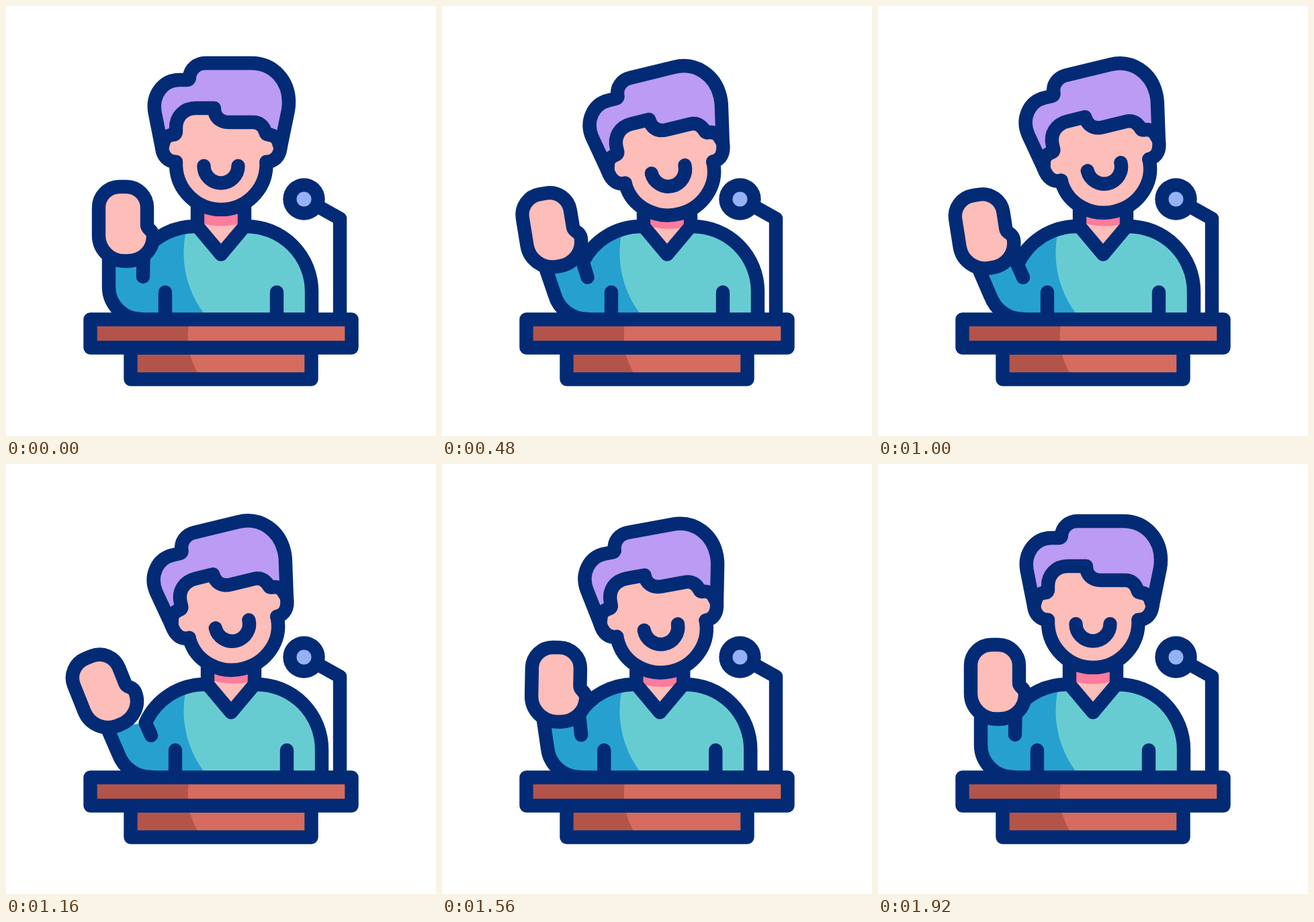
An HTML page with a canvas for the animation above (2000 ms loop, 640x640 px).

```html
<!DOCTYPE html>
<html lang="en">
<head>
<meta charset="utf-8">
<title>Speaker</title>
<style>
html, body { margin: 0; width: 100%; height: 100%; overflow: hidden; background: #fff; }
canvas { display: block; width: 640px; height: 640px; }
</style>
</head>
<body>
<canvas id="stage" width="640" height="640"></canvas>
<script>
const ctx = document.getElementById('stage').getContext('2d');
const LOOP = 2000, STEP = 40, LINE = 20.4, TAU = Math.PI * 2, DEG = Math.PI / 180;
const C = {
  navy: '#032b75', hair: '#bb9bf3', skin: '#fdbdb9', pink: '#fd7b9c',
  blue: '#26a1cf', teal: '#67ccd2', dark: '#b3544a', light: '#d56c5f',
  mic: '#94b2f5', ray: '#ffcc52'
};

const clamp = u => Math.max(0, Math.min(1, u));
const smooth = (t, a, b) => { const u = clamp((t - a) / (b - a)); return u * u * (3 - 2 * u); };
const hold = (t, a, b, c, d) => smooth(t, a, b) - smooth(t, c, d);
const mix = (a, b, u) => a + (b - a) * u;

function fill(path, color) {
  ctx.fillStyle = color;
  ctx.fill(path);
}
function stroke(path, color = C.navy) {
  ctx.strokeStyle = color;
  ctx.stroke(path);
}
function disc(x, y, r, color) {
  ctx.fillStyle = color;
  ctx.beginPath();
  ctx.arc(x, y, r, 0, TAU);
  ctx.fill();
}
function group(draw) {
  ctx.save();
  draw();
  ctx.restore();
}

const hair = new Path2D(
  'M232 211 L221.5 158 C217 132 234 110 258 110 H269 Q273 110 273 106 ' +
  'C274 94 284 85 297 85 H365 C399 85 421 112 421 143 Q421 149 420 155 L408.5 211 ' +
  'L404 198 Q398 191.5 390 191.5 Q387 191 386 187 C383 178 377 173 368 173 H332 ' +
  'C318 173 310 165 310 152 H283 C265 152 253 164 253 182 V187 Q253 191 249 191.5 ' +
  'Q242 191.5 236 198 Z');
const hand = new Path2D(
  'M138 300 A31 31 0 0 1 169 269 H179 A31 31 0 0 1 210 300 V326 ' +
  'C210 333 219 333 219 343 C219 364 202 379.5 181 379.5 H176 A38 38 0 0 1 138 341.5 Z');
const mouth = new Path2D('M294.5 238 A25.5 25.5 0 0 0 345.5 238');
const neck = new Path2D('M285 290 H355 V328 L320 369.6 L285 328 Z');
const collar = new Path2D('M285 295 V328 L320 369.6 L355 328 V295');
const sleeves = new Path2D('M237 426 V466 M403 426 V466');
const shade = new Path2D('M100 300 H280 A152 152 0 0 0 294 457 V480 H100 Z');
const boom = new Path2D('M462 297 L497 316.5 V466');
const top1 = new Path2D('M125.5 466.5 H514.5 V508.5 H125.5 Z');
const top2 = new Path2D('M125.5 466.5 H273 Q269 488 272 508.5 H125.5 Z');
const base1 = new Path2D('M185.5 508.5 H454.5 V555.5 H185.5 Z');
const base2 = new Path2D('M185.5 508.5 H271 Q276 531 290 555.5 H185.5 Z');

function drawBody(shift, arm, headX, headY) {
  const ax = mix(153, 136, arm), ay = mix(375, 394, arm);
  const ex = mix(153, 152.4, arm), ey = mix(418, 432, arm);
  const end = (218 - 13.7 * arm) * DEG;
  const forearm = `M${ax} ${ay} L${ex} ${ey} C${mix(153, 160, arm)} ${mix(444.5, 452, arm)} ` +
    `${mix(174.5, 178, arm)} 466 201 466`;
  const shape = new Path2D(forearm);
  shape.lineTo(455, 466);
  shape.lineTo(455, 425);
  shape.arc(358, 425, 97, 0, -Math.PI / 2, true);
  shape.lineTo(285, 328);
  shape.arc(281, 425, 97, -Math.PI / 2, end - TAU, true);
  shape.closePath();

  group(() => {
    ctx.translate(shift, 0);
    group(() => {
      ctx.clip(shape);
      ctx.translate(-shift, 0);
      ctx.fillStyle = C.teal;
      ctx.fillRect(100, 300, 420, 180);
      fill(shade, C.blue);
    });
    fill(neck, C.skin);
    group(() => {
      ctx.clip(neck);
      disc(320 + headX - shift, 222.5 + headY, 105, C.pink);
    });
    stroke(collar);
    stroke(sleeves);
    stroke(new Path2D(forearm));

    const shoulders = new Path2D();
    shoulders.moveTo(mix(204, 201, arm), mix(403, 404, arm));
    shoulders.arc(281, 425, 97, end, Math.PI * 1.5);
    shoulders.lineTo(285, 328);
    shoulders.moveTo(355, 328);
    shoulders.arc(358, 425, 97, -Math.PI / 2, 0);
    shoulders.lineTo(455, 466);
    stroke(shoulders);
  });
}

function drawHand(shift, arm, angle) {
  group(() => {
    ctx.translate(mix(174, 147.4, arm) + shift, mix(375, 386, arm));
    ctx.rotate(angle * DEG);
    ctx.translate(-174, -375);
    fill(hand, C.skin);
    stroke(hand);
  });
}

// tilt leans the head back: ears sink while jaw and mouth rise
function drawHead(x, y, tilt) {
  const ear = 3.5 * tilt, ry = 67.5 - 4 * tilt;
  const jaw = new Path2D(`M253 ${232 + ear} V238 A67.3 ${ry} 0 0 0 387.5 238 V${232 + ear}`);
  const ears = new Path2D(
    `M232 211 C233.5 ${224 + ear} 241 ${232 + ear} 253 ${232 + ear} ` +
    `M408.5 211 C407 ${224 + ear} 399.5 ${232 + ear} 387.5 ${232 + ear}`);
  group(() => {
    ctx.translate(320 + x, 238 + y);
    ctx.rotate(-13.7 * tilt * DEG);
    ctx.translate(-320, -238);
    disc(253, 211 + ear, 21, C.skin);
    disc(387.5, 211 + ear, 21, C.skin);
    ctx.fillRect(253, 155, 134.5, 90);
    fill(jaw, C.skin);
    fill(hair, C.hair);
    stroke(hair);
    stroke(ears);
    stroke(jaw);
    ctx.translate(0, -7.3 * tilt);
    stroke(mouth);
  });
}

function drawDesk() {
  fill(base1, C.light);
  fill(base2, C.dark);
  stroke(base1);
  fill(top1, C.light);
  fill(top2, C.dark);
  stroke(top1);
}

function drawMic() {
  stroke(boom);
  disc(443.5, 287.5, 31.2, C.navy);
  disc(443.5, 287.5, 11, C.mic);
}

function drawRays(t) {
  const head = 1 - Math.pow(1 - clamp(t / 200), 3);
  const tail = smooth(t, 20, 280);
  if (t <= 0 || tail > 0.97) return;
  for (const [x1, y1, x2, y2] of [[460, 232, 468, 193.5], [495, 268, 533, 259]]) {
    const ray = new Path2D();
    ray.moveTo(mix(x1, x2, tail), mix(y1, y2, tail));
    ray.lineTo(mix(x1, x2, head), mix(y1, y2, head));
    stroke(ray, C.ray);
  }
}

// one slow rise, then a steady wave that weakens and stops
function handSwing(t) {
  if (t < 568) return 20 * smooth(t, 408, 568);
  if (t > 1648) return 0;
  const swing = 10 + 10 * Math.cos((t - 568) / 240 * TAU);
  return swing * (t > 1408 ? 0.55 : 1);
}

function draw(t) {
  const shift = 15 * hold(t, 80, 450, 1340, 1680);
  const arm = hold(t, 120, 620, 1345, 1710);
  const tilt = hold(t, 90, 480, 1400, 1900);
  const bob = t > 668 && t < 1508 ? 7 * Math.sin((t - 668) / 560 * TAU) : 0;
  const x = shift + 3.3 * tilt;
  const y = 12.2 * hold(t, 90, 480, 1440, 1920) + bob;

  ctx.fillStyle = '#fff';
  ctx.fillRect(0, 0, 640, 640);
  ctx.lineWidth = LINE;
  ctx.lineCap = ctx.lineJoin = 'round';
  drawBody(shift, arm, x, y - 8 * tilt);
  drawHand(shift, arm, handSwing(t) - 22 * arm);
  drawHead(x, y, tilt);
  drawMic();
  drawDesk();
  drawRays(t - 640);
  drawRays(t - 1200);
}

const start = performance.now();
function tick() {
  const t = (performance.now() - start) % LOOP;
  draw(Math.floor(t / STEP) * STEP);
  requestAnimationFrame(tick);
}
tick();
</script>
</body>
</html>
```
